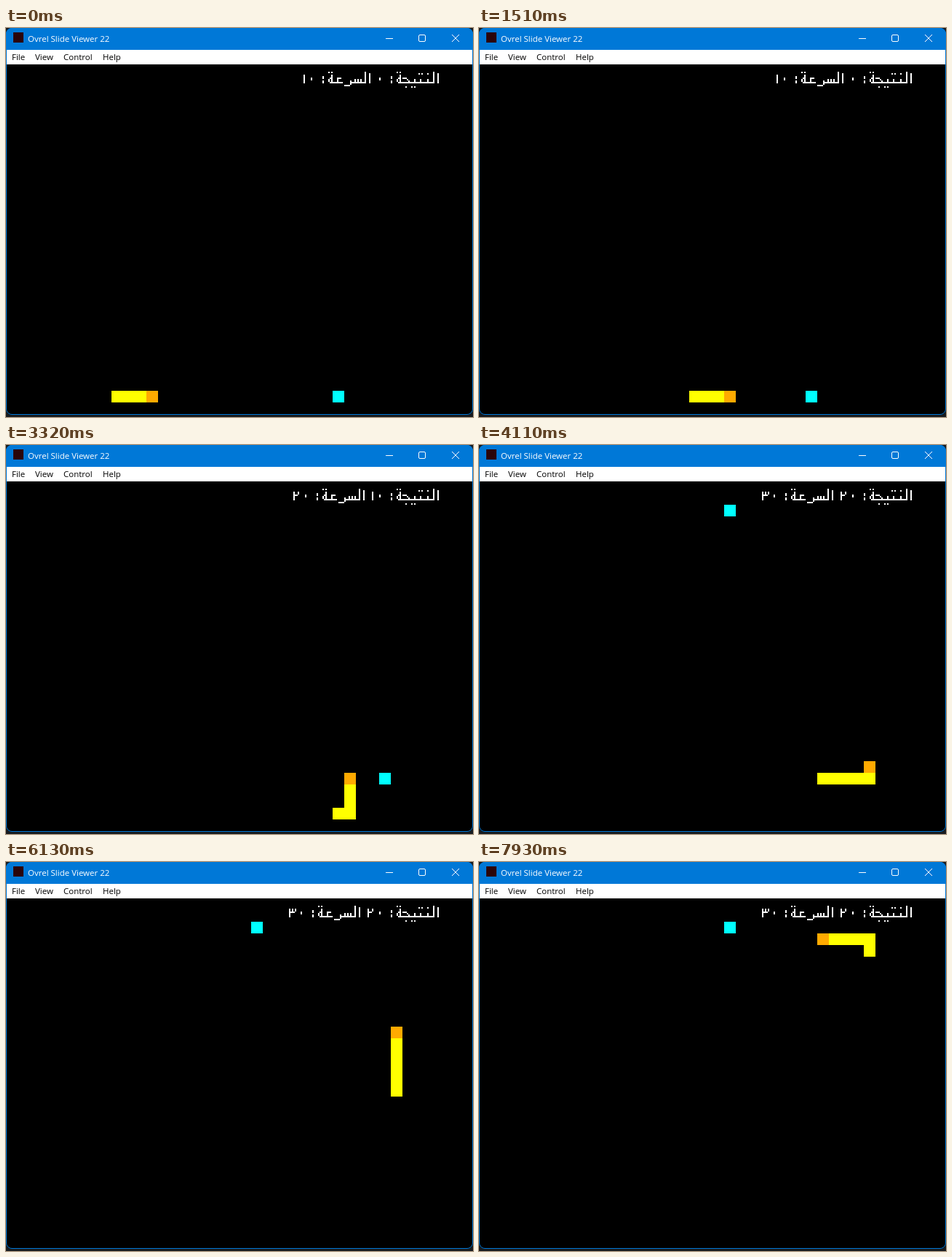
An HTML page for the animation above (8000 ms loop, 642 by 534 pixels).

```html
<!DOCTYPE html>
<html lang="en">
<head>
<meta charset="utf-8">
<title>Snake</title>
<style>
  html, body { margin: 0; width: 100%; height: 100%; overflow: hidden; background: #171b1f; }
  svg { display: block; }
  text { font: 11.5px "Open Sans", "Noto Sans", sans-serif; }
  .line { fill: none; stroke: #fff; }
  .pixel { fill: none; stroke: #fff; stroke-width: 2; stroke-linecap: square; shape-rendering: crispEdges; }
  .cell { shape-rendering: crispEdges; }
</style>
</head>
<body>
<svg width="642" height="534" viewBox="0 0 642 534">
  <defs>
    <clipPath id="window"><rect width="642" height="531" rx="8"/></clipPath>
    <!-- final letter with two dots, then a colon -->
    <path id="ending" d="M544 75H540M542 75V65M540 69h0M538 71v2M538 61h0M542 61h0M530 67v2M530 73v2"/>
  </defs>
  <g clip-path="url(#window)">
    <rect width="642" height="531"/>
    <rect width="642" height="30" fill="#0078d7"/>
    <rect y="30" width="642" height="20" fill="#fff"/>
    <rect y="49" width="642" height="1" fill="#f0f0f0"/>
  </g>
  <rect x=".5" y=".5" width="641" height="530" rx="7.5" fill="none" stroke="#0078d7"/>
  <rect x="10" y="6" width="14" height="14" fill="#2b0509"/>
  <text x="30" y="19" fill="#fff">Ovrel Slide Viewer 22</text>
  <path class="line" d="M522 14.5h10M613 9l10 10m0-10l-10 10"/>
  <rect class="line" x="567.5" y="9.5" width="9" height="9" rx="1.5"/>
  <text x="8" y="44">File</text>
  <text x="40" y="44">View</text>
  <text x="79" y="44">Control</text>
  <text x="133" y="44">Help</text>

  <g class="pixel" id="status" role="img">
    <path d="M594 63V75M588 61V75H544M580 75V71M580 63h0M570 75V71M568 63h0M572 63h0M562 75V71M558 81h0M562 81h0M546 69H550M552 71h0M554 73h0M550 81h0"/>
    <use href="#ending"/>
    <path id="score"/>
    <g id="speedGroup">
      <path d="M500 63V75M494 61V75H474M488 75V71M484 75V71M480 75V71M474 73V77M472 79H466M462 75H450M460 69H456V73"/>
      <use href="#ending" x="-94"/>
      <path id="speed"/>
    </g>
  </g>

  <path class="cell" id="food" fill="#0ff"/>
  <path class="cell" id="body" fill="#ff0"/>
  <path class="cell" id="head" fill="#fa0"/>
</svg>
<script>
const LOOP = 8000, CELL = 16, START_LENGTH = 4;
const FIRST_MOVE = 170, SLOW = 165.7, FAST = 152.8, SLOW_MOVES = 21;
const $ = id => document.getElementById(id);

// Snake route: [dx, dy, cells]
const route = [[1, 0, 20], [0, -1, 3], [1, 0, 4], [0, -1, 22], [-1, 0, 4]];
const track = [[145, 498]];
for (const [dx, dy, count] of route) {
  for (let i = 0; i < count; i++) {
    const [x, y] = track[track.length - 1];
    track.push([x + dx * CELL, y + dy * CELL]);
  }
}

// Moves on which the snake eats; the last food is never reached
const meals = [16, 23];
const foods = [...meals.map(m => track[m + START_LENGTH - 1]), [337, 82]];

// Tens digits, drawn left of the zero dot
const digits = [
  { path: "", width: 0 },
  { path: "m-10 -4v10", width: 8 },
  { path: "m-16 -4v10m0 -6h4m2 -2v-2", width: 14 },
  { path: "m-16 -4v10m0 -6h6m2 -2v-2m-4 0v4", width: 14 }
];
const number = (tens, x) => `M${x} 69v2M${x} 69${digits[tens].path}`;
const square = ([x, y]) => `M${x} ${y}h${CELL}v${CELL}h-${CELL}z`;
const arabic = n => n.toLocaleString("ar-EG");

// The snake moves at a steady pace, then slightly faster
function moveAt(t) {
  const elapsed = t - FIRST_MOVE;
  if (elapsed < 0) return 0;
  const slowTime = SLOW * SLOW_MOVES;
  return 1 + Math.floor(elapsed < slowTime
    ? elapsed / SLOW
    : SLOW_MOVES + (elapsed - slowTime) / FAST);
}

function draw(t) {
  const move = moveAt(t);
  const level = meals.filter(m => move >= m).length;
  const end = move + START_LENGTH;
  const cells = track.slice(end - START_LENGTH - level, end);
  $("head").setAttribute("d", square(cells.pop()));
  $("body").setAttribute("d", cells.map(square).join(""));
  $("food").setAttribute("d", square(foods[level]));

  $("score").setAttribute("d", number(level, 514));
  $("speed").setAttribute("d", number(level + 1, 420));
  $("speedGroup").setAttribute("transform", `translate(${-digits[level].width})`);
  $("status").setAttribute("aria-label",
    `النتيجة: ${arabic(level * 10)} السرعة: ${arabic(level * 10 + 10)}`);
}

const begin = performance.now();
function frame() {
  draw((performance.now() - begin) % LOOP);
  requestAnimationFrame(frame);
}
frame();
</script>
</body>
</html>
```
